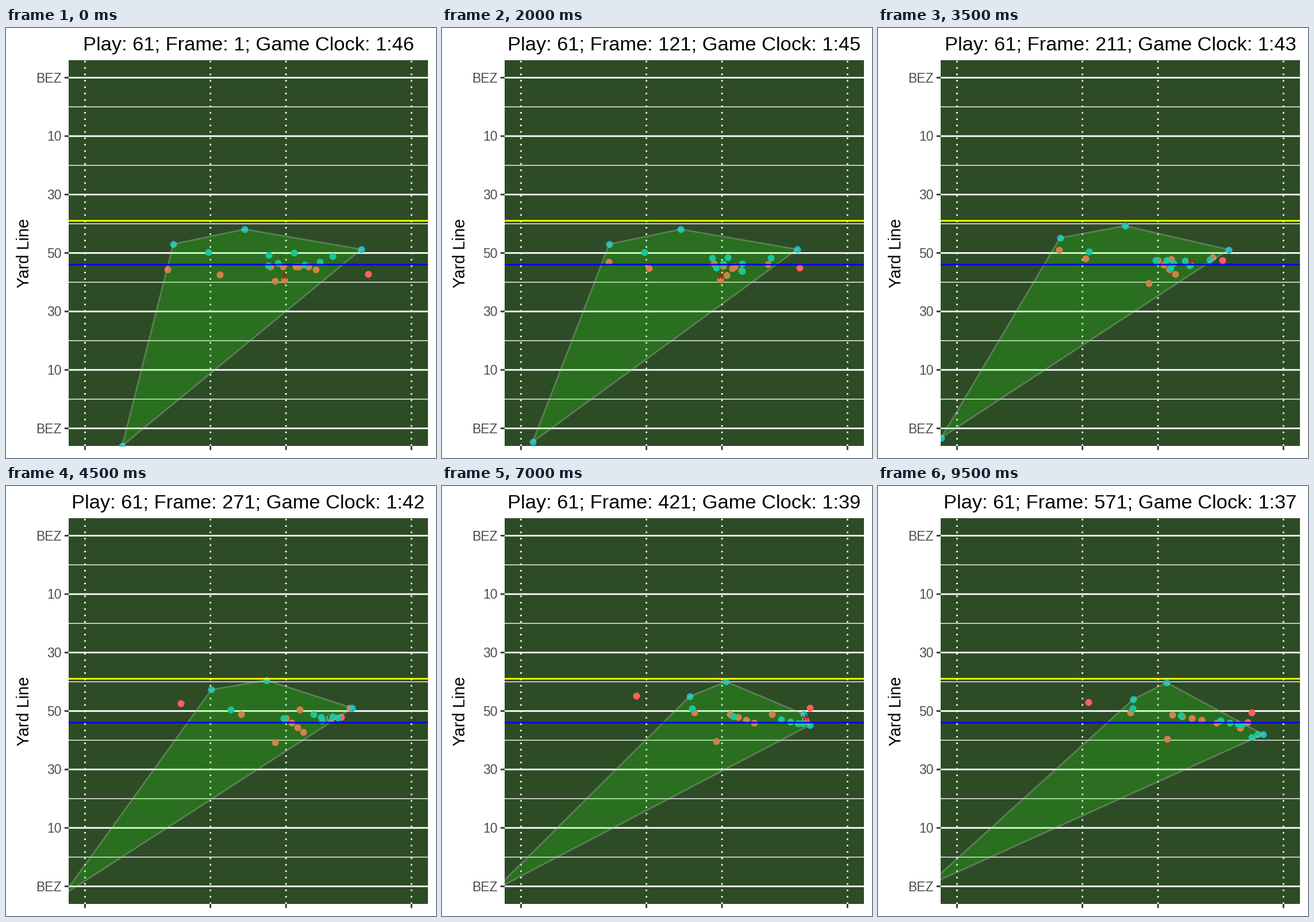
Recreate the animation shown at these times as a matplotlib script. Size 748 px wide and 748 px high, loop 10 s.

```python
import numpy as np
import matplotlib.pyplot as plt
from matplotlib.animation import FuncAnimation
from matplotlib.patches import Polygon, Rectangle

SIZE, DPI = 748, 68
PT = 72 / DPI                      # points per pixel
LEFT, RIGHT, TOP, BOTTOM = 109, 734, 56, 727
LINE, THIN = 2.78 * PT, 1.39 * PT
EM = 2.604 * PT                    # one nominal text point
STEPS, STEP_MS = 20, 500

# phases of the play, as (begin, end) in steps
SNAP, BREAK, TURN, DROP = (2, 4), (3, 6), (6, 9), (4, 9)
DRIFT, CHASE, FINISH = (5.8, 17), (6.5, 16), (9.5, 17)
CONTAIN, LATE = (9.5, 19), (11, 19)

plt.rcParams["font.family"] = "Liberation Sans"


def run(home, *legs):
    """Positions per step; each leg (phase, goal, arc) eases out and bows upward."""
    spot = np.array(home, float)
    track = np.tile(spot, (STEPS, 1))
    for (begin, end), goal, *arc in legs:
        u = np.clip((np.arange(STEPS) - begin) / (end - begin), 0, 1)
        p = np.sin(u * np.pi / 2)
        track += np.outer(p, goal - spot)
        track[:, 1] -= (arc[0] if arc else 0) * np.sin(np.pi * p)
        spot = np.array(goal, float)
    return track


def pursue(home, clash, goal):
    return run(home, (BREAK, clash), (CHASE, goal, 10))


ball = run((484, 431), ((4, 6), (522, 412)), (TURN, (563, 400)),
           ((9, 14), (632, 403), 6), ((14, 19), (629, 415)))

runner = run((468, 440), (BREAK, (523, 419)))
runner[6:] = ball[6:] + (1, 6)

blockers = [run((460 + 22 * k, 415), (BREAK, (487 + 10 * k, 404 + 8 * k)),
                (LATE, (512 + 17 * k, 398 + 3 * k), 4)) for k in range(4)]

offense = np.array([
    run((281, 420), (SNAP, (290, 407)), ((4.7, 12), (439, 394))),
    run((372, 429), (SNAP, (360, 418)), (DROP, (304, 378)), (LATE, (366, 376), 12)),
    run((484, 438), (DROP, (468, 446)), ((13, 19), (503, 440))),
    run((539, 420), (SNAP, (567, 411)), (TURN, (598, 386)), (FINISH, (650, 394), 12)),
    run((630, 428), (BREAK, (615, 405)), (TURN, (583, 402)), (FINISH, (643, 411), 8)),
    run((509, 415), (TURN, (511, 389)), (FINISH, (589, 412), 18)),
    runner, *blockers])

coverage = [
    run((202, 727), ((2, 9), (100, 711)), (LATE, (86, 695))),
    run((291, 376), (DRIFT, (444, 371), 20)),
    run((415, 350), (DRIFT, (502, 342), 9)),
    run((618, 385), (TURN, (602, 386)), (LATE, (650, 437), 18)),
    run((352, 390), (DRIFT, (443, 387))),
    run((457, 395), (BREAK, (483, 404)), (LATE, (527, 399))),
    run((568, 397), (BREAK, (577, 403)), (CONTAIN, (670, 432), 8)),
    run((546, 407), (SNAP, (522, 423)), (TURN, (562, 402)), (CONTAIN, (660, 432), 12))]

pursuit = [
    pursue((501, 391), (494, 406), (596, 408)),
    pursue((473, 409), (505, 411), (612, 412)),
    pursue((519, 412), (525, 407), (633, 415)),
    pursue((456, 413), (499, 420), (626, 414))]

coverage, pursuit = np.array(coverage), np.array(pursuit)
defense = np.concatenate([coverage, pursuit])


def convex_hull(points):
    pts = sorted(map(tuple, points))

    def half(seq):
        out = []
        for x, y in seq:
            while len(out) > 1 and ((out[-1][0] - out[-2][0]) * (y - out[-2][1])
                                    <= (out[-1][1] - out[-2][1]) * (x - out[-2][0])):
                out.pop()
            out.append((x, y))
        return out[:-1]

    return half(pts) + half(pts[::-1])


fig = plt.figure(figsize=(SIZE / DPI, SIZE / DPI), dpi=DPI, facecolor="white")
ax = fig.add_axes([0, 0, 1, 1])
ax.set(xlim=(0, SIZE), ylim=(SIZE, 0))
ax.axis("off")

panel = Rectangle((LEFT, TOP), RIGHT - LEFT, BOTTOM - TOP, fc="#2d4c26", ec="none", zorder=0)
ax.add_patch(panel)


def line(xs, ys, color="white", width=LINE, z=1, style="-"):
    ax.plot(xs, ys, color=color, lw=width, ls=style, zorder=z, snap=False,
            solid_capstyle="butt", dash_capstyle="butt")


for n, label in enumerate(("BEZ", "10", "30", "50", "30", "10", "BEZ")):
    y = 86.4 + 101.67 * n
    line((LEFT, RIGHT), (y, y))
    line((LEFT - 7.2, LEFT), (y, y), "#333333")
    if n < 6:
        line((LEFT, RIGHT), (y + 50.83, y + 50.83), width=THIN)
    ax.text(96.5, y + 8.4, label, ha="right", va="baseline", size=8.8 * EM, color="#4d4d4d")

for x in (137.4, 355.6, 487.1, 705.3):
    line((x, x), (BOTTOM, TOP), style=(0, (1, 3)))
    line((x, x), (BOTTOM, BOTTOM + 7.2), "#333333")

line((LEFT, RIGHT), (335.3, 335.3), "#ffff00", z=6)
line((LEFT, RIGHT), (411.6, 411.6), "#0000ff", z=6)

title = ax.text((LEFT + RIGHT) / 2, 39.3, "", ha="center", va="baseline", size=13.2 * EM)
ax.text(40.5, (TOP + BOTTOM) / 2, "Yard Line", ha="center", va="baseline", rotation=90,
        rotation_mode="anchor", size=11 * EM)


def dots(color, z, marker="o", size=12, edge=0):
    artist, = ax.plot([], [], ls="", marker=marker, ms=size * PT, color=color,
                      mew=edge * PT, zorder=z)
    artist.set_clip_path(panel)
    return artist


red = dots("#ff615e", 2)
cyan_low = dots("#1bb9c1", 3)
star = dots("#a50019", 3.5, marker=(5, 2, 0), size=11.5, edge=2.2)
cyan_high = dots("#1bb9c1", 4)
hull = Polygon([(0, 0), (1, 0), (0, 1)], closed=True, fc=(0.12, 1, 0.02, 0.2),
               ec=(0.75, 0.75, 0.75, 0.33), lw=LINE, zorder=5)
ax.add_patch(hull)
hull.set_clip_path(panel)


def update(i):
    red.set_data(*offense[:, i].T)
    cyan_low.set_data(*coverage[:, i].T)
    cyan_high.set_data(*pursuit[:, i].T)
    star.set_data(ball[i, :1], ball[i, 1:])
    hull.set_xy(convex_hull(defense[:, i]))
    seconds = 46 - i // 2 + (i == 4)   # the clock sticks once early on
    title.set_text(f"Play: 61; Frame: {1 + 30 * i}; Game Clock: 1:{seconds}")
    return red, cyan_low, cyan_high, star, hull, title


anim = FuncAnimation(fig, update, frames=STEPS, interval=STEP_MS, repeat=True,
                     repeat_delay=0, blit=False)
plt.show()
```
